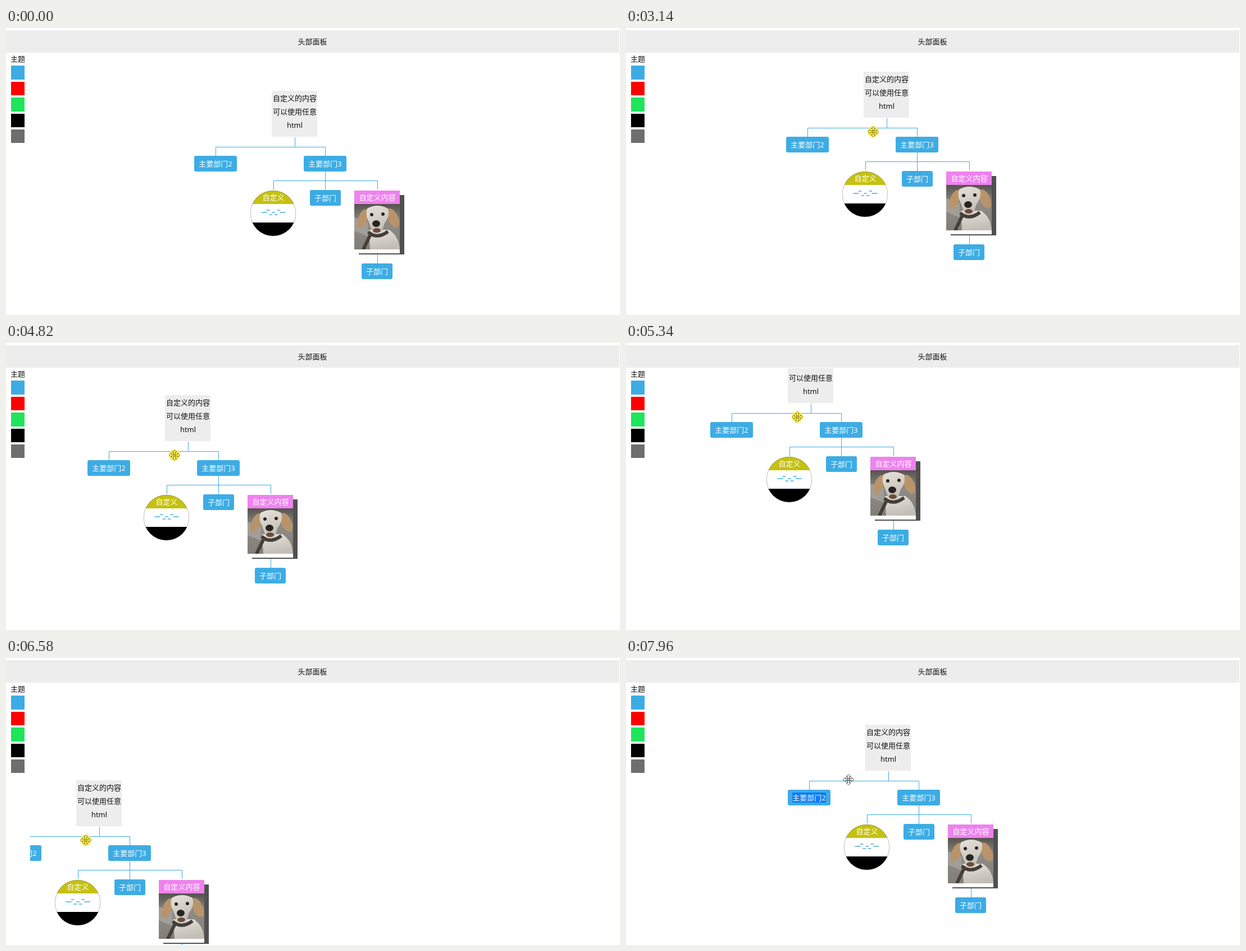
Write an HTML page that moves like this. It is 1093 by 512 pixels and loops after 8 s.

```html
<!DOCTYPE html>
<html lang="zh-CN">
<head>
<meta charset="utf-8">
<title>头部面板</title>
<style>
  html, body { margin: 0; width: 100%; height: 100%; overflow: hidden; background: #fff; }
  svg { display: block; }
  rect:not([rx]) { shape-rendering: crispEdges; }
  text { font: 13px "Noto Sans", "Noto Sans CJK SC", "Noto Sans CJK", sans-serif; text-anchor: middle; fill: #111; }
  .light { fill: #fff; }
  .lines { fill: none; stroke: #3dace4; }
</style>
</head>
<body>
<svg width="1093" height="512" viewBox="0 0 1093 512">
  <defs>
    <clipPath id="disc"><circle cx="2.5" cy="218.5" r="40.5"/></clipPath>
    <clipPath id="photo"><rect width="81" height="81"/></clipPath>
    <linearGradient id="yard" x2="0" y2="1">
      <stop stop-color="#55534d"/><stop offset=".4" stop-color="#8f8c87"/><stop offset="1" stop-color="#817d77"/>
    </linearGradient>
    <linearGradient id="fur" x2=".3" y2="1">
      <stop stop-color="#e6e2da"/><stop offset="1" stop-color="#c3beb5"/>
    </linearGradient>
  </defs>

  <g id="tree">
    <rect width="81" height="82" fill="#ededed"/>
    <text x="41" y="18">自定义的内容</text>
    <text x="41" y="42">可以使用任意</text>
    <text x="41" y="66">html</text>
    <path class="lines" d="M41.5 83V100M-99.5 116V100.500H95.500V116M95.500 143V177M3.500 176V160.500H188.500V176M188.500 292V309"/>
    <g id="buttons"></g>

    <g clip-path="url(#disc)">
      <rect x="-38" y="178" width="82" height="24" fill="#c5c110"/>
      <rect x="-38" y="202" width="82" height="33" fill="#fff"/>
      <rect x="-38" y="235" width="82" height="26"/>
    </g>
    <circle cx="2.5" cy="218.5" r="40.3" fill="none" stroke="#555" stroke-width=".4"/>
    <text class="light" x="3" y="195">自定义</text>
    <g id="waves"></g>

    <rect x="155" y="186" width="81" height="106" fill="#505050"/>
    <rect x="147" y="178" width="81" height="112" fill="#fff"/>
    <rect x="147" y="178" width="81" height="24" fill="#ee82ee"/>
    <text class="light" x="188" y="195">自定义内容</text>
    <g transform="translate(147 202)" clip-path="url(#photo)">
      <rect width="81" height="81" fill="url(#yard)"/>
      <path d="M0 24L24 32V58L0 48Z" fill="#a19e99"/>
      <path d="M26 46H62Q80 58 81 81H28Z" fill="url(#fur)"/>
      <path d="M25 50Q40 64 60 49M28 56L16 81" fill="none" stroke="#453f3a" stroke-width="6"/>
      <g fill="#b9946a">
        <ellipse cx="15" cy="26" rx="8" ry="18" transform="rotate(22 15 26)"/>
        <ellipse cx="69" cy="25" rx="9" ry="18" transform="rotate(-24 69 25)"/>
      </g>
      <path d="M23 8Q41-2 60 8Q64 22 54 34L49 49Q40 56 32 49L26 32Q19 20 23 8Z" fill="url(#fur)"/>
      <ellipse cx="40" cy="47" rx="7" ry="4" fill="#6d4b3b"/>
      <g fill="#282421">
        <ellipse cx="39" cy="35" rx="7" ry="6"/>
        <circle cx="31" cy="19" r="3"/>
        <circle cx="51" cy="18" r="3"/>
      </g>
    </g>
  </g>

  <path d="M0 0H1093V45H43V512H0Z" fill="#fff"/>
  <rect y="4" width="1092" height="40" fill="#ededed"/>
  <text x="545.5" y="29">头部面板</text>
  <text x="21" y="60">主题</text>
  <g id="swatches"></g>

  <g id="cursor">
    <circle id="press" r="10" fill="#fbee5c"/>
    <g id="arrows"></g>
  </g>
</svg>
<script>
const $ = id => document.getElementById(id);
const LOOP = 8000, ENTER = 570, PRESS = 2860, RELEASE = 7570;
const GRIP = [17, 107];

// Turning points: time, x, y
const dragPath = [
  [PRESS, 473, 112], [3140, 423, 78], [3320, 393, 96], [3520, 408, 121], [3890, 577, 99],
  [4530, 312, 86], [4820, 283, 93], [5080, 235, 65], [5340, 288, 25], [5870, 109, 16],
  [6150, 88, 24], [6580, 125, 218], [6970, 351, 235], [RELEASE, 426, 119]
];
const approachPath = [[ENTER, 1003, 506], [1370, 810, 337], [2000, 525, 149], [2750, 490, 219]];
const leavePath = [[7790, 443, 226], [7960, 396, 217]];

// Smooth curve through the points of a path
function along(path, t) {
  const last = path.length - 1;
  if (t <= path[0][0]) return path[0].slice(1);
  if (t >= path[last][0]) return path[last].slice(1);
  const i = path.findIndex(p => p[0] > t) - 1;
  const a = path[i], b = path[i + 1];
  const before = path[Math.max(i - 1, 0)], after = path[Math.min(i + 2, last)];
  const span = b[0] - a[0], u = (t - a[0]) / span;
  return [1, 2].map(k => {
    const ma = (b[k] - before[k]) / (b[0] - before[0]) * span;
    const mb = (after[k] - a[k]) / (after[0] - a[0]) * span;
    const d = b[k] - a[k];
    return a[k] + u * (ma + u * (3 * d - 2 * ma - mb + u * (ma + mb - 2 * d)));
  });
}

const button = (x, y, width, label, extra = '') =>
  `<rect x="${x}" y="${y}" width="${width}" height="28" rx="3" fill="#3dace4"/>${extra}
   <text class="light" x="${x + width / 2}" y="${y + 18.5}">${label}</text>`;

$('buttons').innerHTML =
  button(-138, 116, 76, '主要部门2', '<rect id="selection" x="-130" y="121" width="60" height="18" fill="#0a7cfa"/>') +
  button(57, 116, 76, '主要部门3') +
  button(68, 177, 55, '子部门') +
  button(160, 308, 55, '子部门');

$('swatches').innerHTML = ['#3dace4', '#f00', '#1fe55c', '#000', '#6e6e6e'].map((color, i) =>
  `<rect x="9" y="${67.4 + 28.4 * i}" width="24.4" height="24.4" fill="${color}"/>`).join('');

// A mirrored row of dashes on three levels, counted outwards from the middle
const levels = [0, 1, -1, 0, 0];
$('waves').innerHTML = Array.from({ length: 9 }, (_, i) => i - 4).map(i =>
  `<rect x="${4.7 * i}" y="${216 + 4 * levels[Math.abs(i)]}" width="6" height="2" rx=".8"/>`).join('');

$('arrows').innerHTML = [0, 90, 180, 270].map(angle =>
  `<path transform="rotate(${angle})" d="M-1.5-1.5V-5.500H-4L0-9.500 4-5.500H1.500V-1.500Z"/>`).join('');

function place(id, [x, y]) {
  $(id).setAttribute('transform', `translate(${Math.round(x)} ${Math.round(y)})`);
}
function show(id, visible) {
  $(id).style.display = visible ? '' : 'none';
}

function draw(t) {
  const tree = along(dragPath, t);
  const pressed = t >= PRESS && t < RELEASE;
  const cursor = t < PRESS ? along(approachPath, t)
    : pressed ? tree.map((v, i) => v + GRIP[i])
    : along(leavePath, t);
  place('tree', tree);
  place('cursor', cursor);
  show('cursor', t >= ENTER);
  show('press', pressed);
  show('selection', t >= RELEASE);
  $('arrows').setAttribute('fill', pressed ? '#fbee5c' : '#fff');
  $('arrows').setAttribute('stroke', pressed ? '#8a7d14' : '#444');
  const pulse = 0.5 - 0.5 * Math.cos(t / 1000 * Math.PI * 2);
  $('waves').setAttribute('fill', `hsl(198 ${60 + 20 * pulse}% 67%)`);
}

function frame() {
  draw(performance.now() % LOOP);
  requestAnimationFrame(frame);
}
frame();
</script>
</body>
</html>
```
